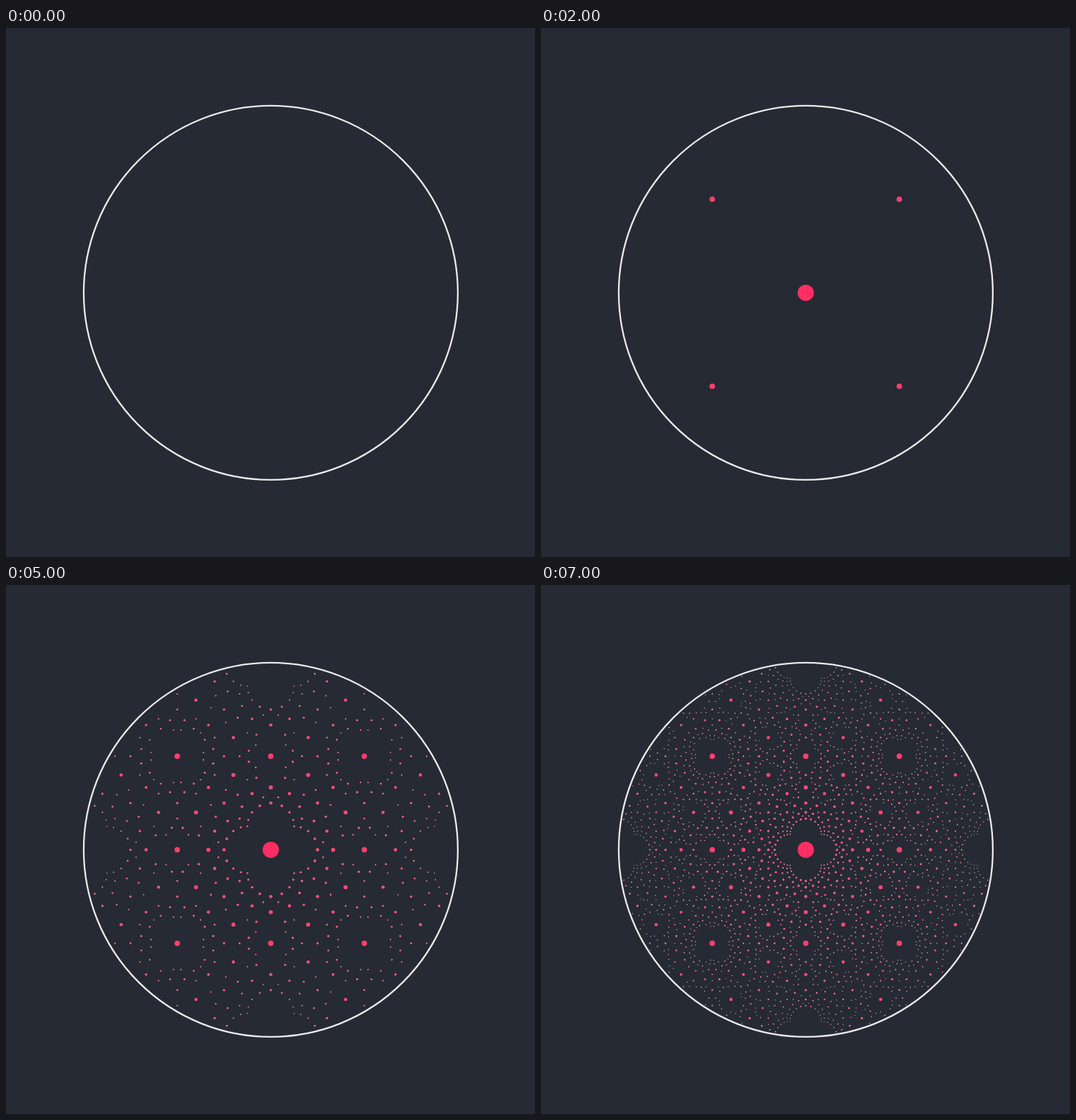
An HTML page with a canvas for the animation above (8 s loop, 748 by 748 pixels).

```html
<!DOCTYPE html>
<html lang="en">
<head>
<meta charset="utf-8">
<title>Gaussian rationals in the unit disk</title>
<style>
  html, body { margin: 0; height: 100%; overflow: hidden; background: #262a34; }
  canvas { display: block; }
</style>
</head>
<body>
<canvas id="stage" width="748" height="748"></canvas>
<script>
const ctx = document.getElementById('stage').getContext('2d');
const CENTER = 374.4, RADIUS = 264.5, DOT = 11.5, LIMIT = 6, LOOP = 8000;
const PINK = [255, 46, 99], PALE = [234, 234, 234];

const mix = t => `rgb(${PINK.map((v, i) => Math.round(v + (PALE[i] - v) * t))})`;

// Every fraction (a+bi)/(c+di) inside the unit circle, parts up to LIMIT.
function fractions() {
  const list = [];
  for (let c = 1; c <= LIMIT; c++)
    for (let d = 0; d <= LIMIT; d++)
      for (let a = -LIMIT; a <= LIMIT; a++)
        for (let b = -LIMIT; b <= LIMIT; b++) {
          const norm = c * c + d * d;
          if (a * a + b * b >= norm) continue;
          const parts = [a, b, c, d].map(Math.abs);
          list.push({
            x: (a * c + b * d) / norm,
            y: (b * c - a * d) / norm,
            height: parts.reduce((sum, v) => sum + v),
            step: a || b ? Math.max(...parts) + 1 : 1
          });
        }
  return list;
}

// Keep only the lowest terms of each value.
const lowest = new Map();
for (const f of fractions().sort((p, q) => p.height - q.height)) {
  const key = Math.round(f.x * 1e5) + ',' + Math.round(f.y * 1e5);
  if (!lowest.has(key)) lowest.set(key, f);
}
const dots = [...lowest.values()];

function circle(x, y, r) {
  ctx.beginPath();
  ctx.arc(CENTER + x * RADIUS, CENTER - y * RADIUS, r, 0, 2 * Math.PI);
}

function draw(step) {
  ctx.fillStyle = '#262a34';
  ctx.fillRect(0, 0, 748, 748);
  for (const { x, y, height, step: born } of dots) {
    if (born > step) continue;
    ctx.fillStyle = mix((height - 1) / (4 * LIMIT));
    circle(x, y, DOT / height);
    ctx.fill();
  }
  ctx.strokeStyle = '#eaeaea';
  ctx.lineWidth = 2.3;
  circle(0, 0, RADIUS);
  ctx.stroke();
}

let shown = -1;
function tick() {
  const step = Math.floor(performance.now() % LOOP / 1000);
  if (step !== shown) draw(shown = step);
  requestAnimationFrame(tick);
}
tick();
</script>
</body>
</html>
```
